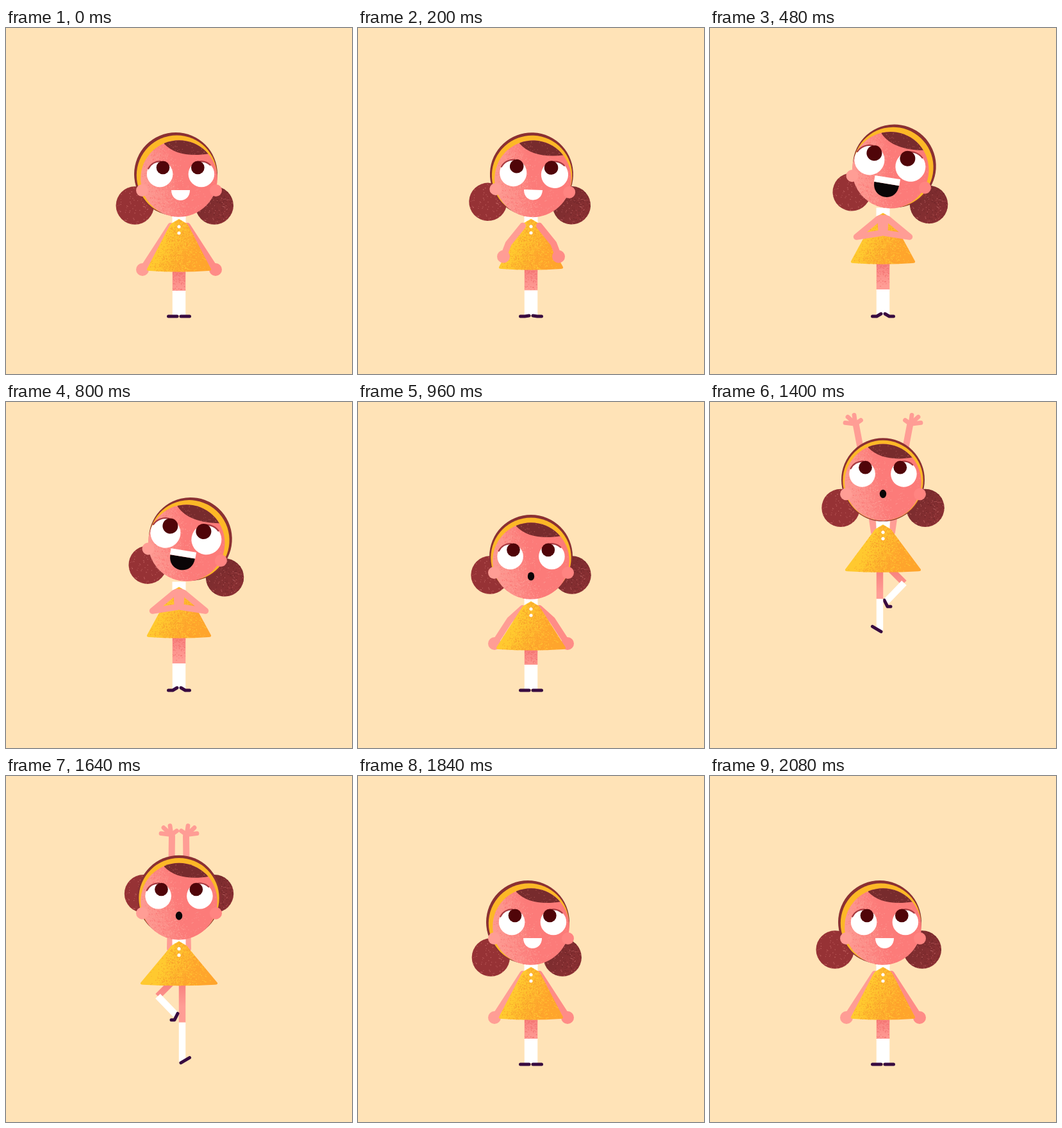
Recreate the animation shown at these times as an HTML page with a canvas. Size 540 px wide and 540 px high, loop 2.12 s.

```html
<!DOCTYPE html>
<html lang="en">
<head>
<meta charset="utf-8">
<title>Jumping girl</title>
<style>
html, body { margin: 0; width: 100%; height: 100%; overflow: hidden; background: #ffe3b7; }
canvas { display: block; width: 100vw; height: 100vh; }
</style>
</head>
<body>
<canvas id="stage" width="540" height="540"></canvas>
<script>
const ctx = document.getElementById('stage').getContext('2d');
const LOOP = 2120, STEP = 40, MID = 270, SOLE = 448, TAU = Math.PI * 2;
const PALE = '#ff9d95', PINK = '#fc7b79', HAIR = '#963235', DARK = '#772b2d';
const BAND = '#fdb827', SHOE = '#380b40', PUPIL = '#500509', BLACK = '#0a0507';

// Key poses with the feet on the ground; the jump is added on top.
const stand = {
  x: 270, y: 235, tilt: 0, hairX: -5, hairY: -7, eyeY: -7, eyeR: 20.3,
  spread: 62, drop: 42, top: 299, hem: 380, half: 50,
  elbowX: 237, elbowY: 340, handX: 213, handY: 377,
  sock: 38, kickL: 0, kickR: 0, toe: 2, heel: 2
};
const dip = { ...stand, y: 240, top: 302 };
const clasp = {
  ...stand, x: 281.7, y: 222, tilt: 9.3, hairX: 5, eyeY: -10.3, eyeR: 23.5,
  spread: 61, drop: 43.5, top: 289.5, hem: 368, elbowX: 228.5, elbowY: 326,
  handX: 267, handY: 299, sock: 40, heel: -2
};
const crouch = { ...dip, y: 248, hairX: 0, spread: 64, drop: 22, top: 312, hem: 387, half: 54 };
const float = {
  ...stand, y: 217, hairX: 0, hairY: -4, eyeY: -13, spread: 66, drop: 40,
  top: 284, hem: 357, half: 59, elbowX: 244, elbowY: 209, handX: 226, handY: 125,
  sock: 49, kickR: 1, toe: -6
};
const rise = {
  ...float, y: 221, hairY: -8, eyeY: -12, spread: 56, drop: 47, top: 285, hem: 367,
  half: 50, elbowX: 237, elbowY: 219, handX: 215.5, handY: 136
};
const touch = {
  ...float, y: 198, hairY: -7, eyeY: -8.5, spread: 55.5, drop: -12, top: 261, hem: 329,
  half: 60, elbowX: 258, elbowY: 182, handX: 257, handY: 93, sock: 61, kickL: 1, kickR: 0
};
const squash = { ...dip, y: 242, drop: 12, top: 306, hem: 382, half: 58 };

const KEYS = [[0, stand], [120, dip], [360, clasp], [840, clasp], [960, crouch], [1080, rise],
  [1400, float], [1640, touch], [1680, squash], [1840, stand], [LOOP, stand]];
const TAKEOFF = 960, PEAK = 1240, TOUCH = 1644, HEIGHT = 104;

const mix = (a, b, u) => a + (b - a) * u;

function lift(t) {
  if (t < TAKEOFF || t > TOUCH) return 0;
  return HEIGHT * (t < PEAK
    ? 1 - ((PEAK - t) / (PEAK - TAKEOFF)) ** 3
    : 1 - ((t - PEAK) / (TOUCH - PEAK)) ** 2.3);
}

function poseAt(t) {
  const i = KEYS.findIndex(([time]) => time > t);
  const [t0, a] = KEYS[i - 1], [t1, b] = KEYS[i];
  const u = (t - t0) / (t1 - t0), s = u * u * (3 - 2 * u), pose = {};
  for (const k in a) pose[k] = mix(a[k], b[k], s);
  // The hair buns keep swinging after the landing, across the loop point.
  if (t >= 1680 || t <= 240) {
    const swing = 7 * Math.cos(TAU * (t - 120) / 480);
    pose.spread += swing;
    pose.drop -= swing;
  }
  if (a === clasp && b === clasp) pose.y -= 2 * s;
  return pose;
}

let seed = 7;
function rnd() {
  seed = (seed * 16807) % 2147483647;
  return seed / 2147483647;
}
// Stipple inside a w by h box; keep(u, v) is the density, u and v from 0 to 1.
function grain(count, x, y, w, h, keep) {
  const path = new Path2D();
  for (let i = 0; i < count; i++) {
    const u = rnd(), v = rnd(), s = .8 + rnd() * .6;
    if (rnd() < keep(u, v)) path.rect(x + u * w, y + v * h, s, s);
  }
  return path;
}
const bump = d => Math.exp(-d * d * 30);
const faceLight = grain(4200, -60, -60, 120, 120, (u, v) => 1.05 - u * 1.9 + (v - .5) * .5);
const faceSpeck = grain(420, -60, -60, 120, 120, u => u);
const faceDeep = grain(3000, -60, -60, 120, 120, (u, v) => bump(u - .2 - v * .1) * .6);
const bunSpeck = grain(110, -30, -30, 60, 60, () => 1);
const bunDeep = grain(800, -30, -30, 60, 60, (u, v) => u * .8 - v * .2);
const dressDark = grain(4200, -60, 0, 120, 84, (u, v) => bump(u - .57 + v * .18) * .8);
const dressLight = grain(3000, -60, 0, 120, 84, (u, v) => bump(u - .66 + v * .14) * .6);
const fringeSpeck = grain(130, -30, -62, 90, 40, () => 1);
const legDeep = grain(260, -11, -5, 22, 40, (u, v) => 1 - v);

function fill(color, path) {
  ctx.fillStyle = color;
  path ? ctx.fill(path) : ctx.fill();
}
function stroke(width, color, cap = 'round') {
  ctx.lineWidth = width;
  ctx.lineCap = cap;
  ctx.lineJoin = 'round';
  ctx.strokeStyle = color;
  ctx.stroke();
}
function disc(x, y, r, color, ry = r) {
  ctx.beginPath();
  ctx.ellipse(x, y, r, ry, 0, 0, TAU);
  fill(color);
}
function line(points, width, color, cap) {
  ctx.beginPath();
  points.forEach(([x, y]) => ctx.lineTo(x, y));
  stroke(width, color, cap);
}
function ramp(x0, y0, x1, y1, ...stops) {
  const g = ctx.createLinearGradient(x0, y0, x1, y1);
  stops.forEach(([pos, color]) => g.addColorStop(pos, color));
  return g;
}
function layer(draw) {
  ctx.save();
  draw();
  ctx.restore();
}
function headFrame(p, draw) {
  layer(() => {
    ctx.translate(p.x, p.y);
    ctx.rotate(p.tilt * Math.PI / 180);
    draw();
  });
}

function bun(p, side) {
  headFrame(p, () => {
    ctx.translate(p.hairX * 1.35 + side * p.spread, p.drop);
    disc(0, 0, 29.7, side > 0 ? ramp(-24, -18, 24, 18, [0, DARK], [1, '#8b3033']) : HAIR);
    ctx.clip();
    if (side > 0) fill('#702629', bunDeep);
    fill(side > 0 ? '#b5595a' : '#c0605f', bunSpeck);
  });
}

// Blends between a straight leg and one folded behind the skirt.
function leg(p, side, kick) {
  const x = (straight, bent) => MID + side * mix(straight, bent, kick);
  const y = (straight, bent) => mix(straight, p.hem + bent, kick);
  const top = p.hem - 5, knee = [x(5, 33), y(SOLE - p.sock, 17)], ankle = [x(5, 5), y(SOLE, 46)];
  const toe = [x(16.5, 12), y(SOLE + p.toe, 54)], heel = [x(3, 2), y(SOLE + p.heel, 44)];
  const arch = [(toe[0] + heel[0]) / 2, Math.max(toe[1], (toe[1] + heel[1]) / 2)];
  const skin = ramp(0, top, 0, top + 38, [0, '#f77f7d'], [1, PALE]);
  line([[x(5, 11), top], knee], 10.5, skin, 'butt');
  line([knee, ankle], 10.5, '#fff', 'butt');
  line([toe, arch, heel], 5, SHOE);
}
function legs(p) {
  leg(p, 1, p.kickR);
  leg(p, -1, p.kickL);
  layer(() => {
    ctx.beginPath();
    ctx.rect(MID - 10, p.hem, 20, SOLE - p.sock - p.hem);
    ctx.clip();
    ctx.translate(MID, p.hem);
    if (p.kickL + p.kickR === 0) fill('#f2716f', legDeep);
  });
}

function arm(p, hands, color) {
  const { elbowX: ex, elbowY: ey, handX: hx, handY: hy, top } = p;
  if (hands === 'spread') {
    ctx.beginPath();
    ctx.moveTo(256, top + 11);
    ctx.quadraticCurveTo(ex, ey, hx + 2, hy + 3);
    stroke(10, color);
    for (const [dx, dy] of [[-15, -1], [-11, -10], [-1, -13], [9.5, -5]])
      line([[hx + 1, hy + 1], [hx + dx, hy + dy]], 6.8, color);
  } else if (hands === 'clasp') {
    line([[263, top + 8], [ex, ey], [hx, hy + 21]], 9.5, color);
    line([[hx, hy - 2], [hx + 1, hy + 20]], 11, color);
  } else {
    line([[257, top + 10], [ex, ey], [hx, hy]], 10, color);
    disc(hx, hy, 10, color);
  }
}
function arms(p, hands) {
  arm(p, hands, PALE);
  layer(() => {
    ctx.translate(2 * MID, 0);
    ctx.scale(-1, 1);
    arm(p, hands, hands === 'fist' ? '#ff8c87' : PALE);
  });
}

function dress({ top, hem, half }) {
  layer(() => {
    ctx.translate(MID, top);
    ctx.fillStyle = '#fff';
    ctx.fillRect(-10.5, -9, 21, 17);
    const h = hem - top;
    ctx.beginPath();
    ctx.moveTo(-15, 10);
    ctx.quadraticCurveTo(-13, 6, -10, 5);
    ctx.lineTo(0, -1);
    ctx.lineTo(10, 5);
    ctx.quadraticCurveTo(13, 6, 15, 10);
    ctx.lineTo(half, h - 4);
    ctx.quadraticCurveTo(half + 1, h - 1, half - 4, h - 1);
    ctx.quadraticCurveTo(0, h + 2, 4 - half, h - 1);
    ctx.quadraticCurveTo(-half - 1, h - 1, -half, h - 4);
    ctx.closePath();
    fill(ramp(-22, 35, 22, 53, [0, '#ffc92f'], [.4, '#febd2d'], [.75, '#ffaa2d'], [1, '#ffa52c']));
    ctx.clip();
    fill('#f9a02b', dressDark);
    fill('#ffc834', dressLight);
    disc(0, 11, 2.6, '#fff');
    disc(0, 21, 2.6, '#fff');
  });
}

function eye(x, y, r, look, lidFrom, lidTo) {
  disc(x, y, r, '#fff');
  ctx.beginPath();
  ctx.arc(x, y, r - .5, lidFrom, lidTo);
  stroke(2.2, '#a8393f');
  disc(x + look * r / 20, y - r / 2, r * .51, PUPIL);
}

function mouth(t, x, eyeY) {
  const bowl = (y, rx, ry, color) => {
    ctx.beginPath();
    ctx.moveTo(x - rx, y);
    ctx.bezierCurveTo(x - rx, y + ry * 1.33, x + rx, y + ry * 1.33, x + rx, y);
    ctx.closePath();
    fill(color);
  };
  if (t < 240 || t >= 1680) {
    bowl(eyeY + 25, 14.5, 16, '#fff');
  } else if (t < TAKEOFF) {
    const s = Math.min(1, .6 + (t - 240) / 300, .5 + (TAKEOFF - t) / 160);
    bowl(22, 19.5 * s, 21 * s, BLACK);
    ctx.fillStyle = '#fff';
    ctx.fillRect(x - 20 * s, 22 - 10 * s, 40 * s, 10 * s);
  } else {
    disc(x, eyeY + 31, 5.2, BLACK, 6.6);
  }
}

function face() {
  disc(0, 0, 59.8, ramp(-62, 14, 30, -4, [0, '#fd9c94'], [.3, '#fc8f89'], [.65, PINK]));
  ctx.clip();
  fill('#fb7876', faceDeep);
  fill('#fd9b93', faceLight);
  fill('#fb908b', faceSpeck);
  ctx.beginPath();
  ctx.moveTo(-23, -54);
  ctx.bezierCurveTo(-8, -38, 18, -34, 47, -39);
  ctx.lineTo(62, -70);
  ctx.lineTo(-23, -70);
  ctx.closePath();
  fill(DARK);
  ctx.clip();
  fill('#a04a49', fringeSpeck);
}

function head(p, t) {
  headFrame(p, () => {
    const eyeX = -p.hairX / 2;
    disc(p.hairX, p.hairY, 65, '#8a3033');
    disc(p.hairX * .7, p.hairY * .7, 62.7, BAND);
    layer(face);
    disc(-57.5, 18.5, 9.5, PALE);
    disc(57.5, 18.5, 9.5, '#ff8481');
    eye(eyeX - 32.4, p.eyeY, p.eyeR, 4.8, -2.7, -1.5);
    eye(eyeX + 32.4, p.eyeY, p.eyeR, -5.5, -2.1, -.8);
    mouth(t, eyeX, p.eyeY);
  });
}

function draw(t) {
  const p = poseAt(t);
  const hands = t >= 320 && t < 920 ? 'clasp' : t >= 1000 && t < 1680 ? 'spread' : 'fist';
  const armsInFront = t >= 200 && t < 920;
  ctx.fillStyle = '#ffe3b7';
  ctx.fillRect(0, 0, 540, 540);
  layer(() => {
    ctx.translate(0, -lift(t));
    bun(p, -1);
    bun(p, 1);
    if (!armsInFront) arms(p, hands);
    legs(p);
    dress(p);
    if (armsInFront) arms(p, hands);
    head(p, t);
  });
}

const start = performance.now();
function tick() {
  const t = (performance.now() - start) % LOOP;
  draw(Math.floor(t / STEP) * STEP);
  requestAnimationFrame(tick);
}
tick();
</script>
</body>
</html>
```
